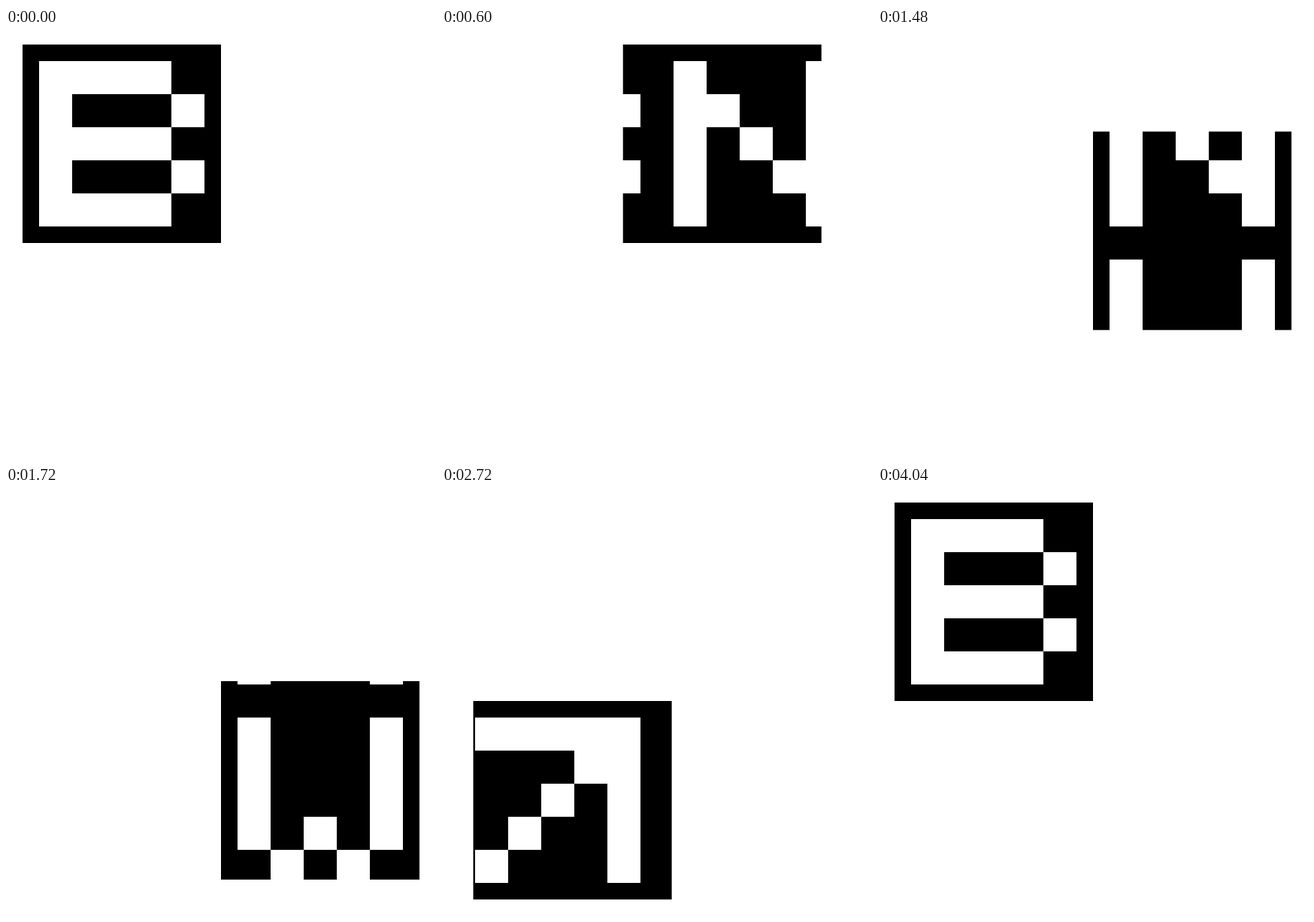
An HTML page with a canvas that plays this animation: 650x650 px, repeating every 5000 ms.

```html
<!DOCTYPE html>
<html>
<head>
<meta charset="utf-8">
<style>
  html, body { margin: 0; width: 100%; height: 100%; overflow: hidden; background: #fff; }
  canvas { display: block; }
</style>
</head>
<body>
<canvas id="stage" width="650" height="650"></canvas>
<script>
const ctx = document.getElementById('stage').getContext('2d');
const LOOP = 5000, STEP = 40, CELL = 50;

// White glyphs, invisible until the black square passes behind them
const glyphs = [
  { x: 50, y: 50, rows: ['####.', '#...#', '####.', '#...#', '####.'] },
  { x: 350, y: 50, rows: ['#...#', '##..#', '#.#.#', '#..##', '#...#'] },
  { x: 350, y: 350, rows: ['#...#', '#...#', '#...#', '#.#.#', '.#.#.'] },
  { x: 50, y: 350, rows: ['#####', '...##', '..#.#', '.#..#', '#...#'] }
];

// The square's trip around the four corners
const legs = [
  { start: 14, span: 1000, dx: 300, dy: 0, ease: [1 / 3, 2 / 3, 2 / 3, 1] },
  { start: 1180, span: 880, dx: 0, dy: 300, ease: [0.5, 0, 0.125, 1] },
  { start: 2180, span: 835, dx: -300, dy: 0, ease: [0.5, 0, 0.097, 1] },
  { start: 3220, span: 820, dx: 0, dy: -300, ease: [0.951, 0, 0.462, 1] }
];

const curve = (a, b, s) => 3 * (1 - s) ** 2 * s * a + 3 * (1 - s) * s * s * b + s ** 3;

function bezier([x1, y1, x2, y2], u) {
  if (u <= 0) return 0;
  if (u >= 1) return 1;
  let lo = 0, hi = 1;
  for (let i = 0; i < 30; i++) {
    const mid = (lo + hi) / 2;
    if (curve(x1, x2, mid) < u) lo = mid; else hi = mid;
  }
  return curve(y1, y2, lo);
}

function draw(t) {
  let x = 25, y = 25;
  for (const leg of legs) {
    const p = bezier(leg.ease, (t - leg.start) / leg.span);
    x += leg.dx * p;
    y += leg.dy * p;
  }
  ctx.fillStyle = '#fff';
  ctx.fillRect(0, 0, 650, 650);
  ctx.fillStyle = '#000';
  ctx.fillRect(x, y, 300, 300);
  ctx.fillStyle = '#fff';
  for (const g of glyphs)
    g.rows.forEach((row, r) => [...row].forEach((c, i) => {
      if (c === '#') ctx.fillRect(g.x + i * CELL, g.y + r * CELL, CELL, CELL);
    }));
}

function tick() {
  draw(Math.floor(performance.now() % LOOP / STEP) * STEP);
  requestAnimationFrame(tick);
}
tick();
</script>
</body>
</html>
```
